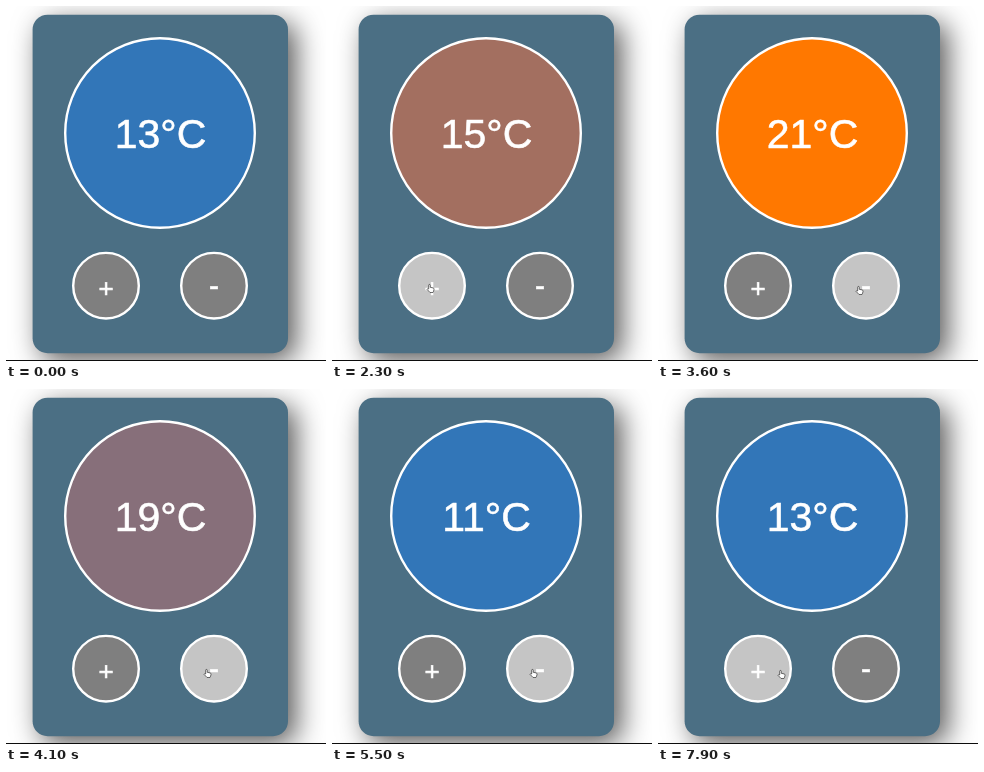
Recreate the animation shown at these times as an HTML page. Size 320x355 px, loop 8000 ms.

```html
<!DOCTYPE html>
<html lang="en">
<head>
<meta charset="utf-8">
<title>Thermostat</title>
<style>
  html, body { margin: 0; width: 100%; height: 100%; overflow: hidden; background: #fff; }
  svg { display: block; width: 100vw; height: 100vh; }
  text {
    font-family: "Liberation Sans", Arial, sans-serif;
    fill: #fff; stroke: #fff; stroke-width: .6; text-anchor: middle;
  }
  .card { fill: #4b6f84; filter: drop-shadow(8px 8px 14px rgba(0, 0, 0, .65)); }
  .ring { stroke: #fff; stroke-width: 2.4; }
</style>
</head>
<body>
<svg viewBox="0 0 320 355">
  <rect class="card" x="26.6" y="8.7" width="255.4" height="338.5" rx="15"/>
  <rect y="354" width="320" height="1" fill="#0c0c0c"/>
  <circle id="dial" class="ring" cx="154" cy="127" r="94.8"/>
  <text id="temp" x="154.5" y="141.7" font-size="41"></text>
  <circle id="plus" class="ring" cx="100" cy="279.7" r="32.8"/>
  <text x="100" y="290.5" font-size="26">+</text>
  <circle id="minus" class="ring" cx="208" cy="279.7" r="32.8"/>
  <text x="208" y="290" font-size="30">-</text>
  <path id="hand" fill="#fff" stroke="#333" stroke-width="1.3" stroke-linejoin="round"
    d="M4 9V2.2a1.4 1.4 0 0 1 2.8 0V6l5.2 1.1q2 .5 1.7 2.6l-.8 3.3-1 2.4H6.4L1 9.8q.4-2 3-.8z"/>
</svg>
<script>
const LOOP = 8000, STEP = 100, FADE = 500;
const COLD = [50, 118, 184], HOT = [255, 120, 0];
const BEND = [0, -8, 14]; // pulls the halfway colour towards rose
const el = id => document.getElementById(id);
const [dial, temp, plus, minus, hand] = ['dial', 'temp', 'plus', 'minus', 'hand'].map(el);

// steady runs of button presses
const runs = [
  { from: 1960, gap: 180, presses: 8, by: 1 },
  { from: 3800, gap: 180, presses: 10, by: -1 },
  { from: 7500, gap: 400, presses: 2, by: 1 }
];
const heatAt = runs[0].from + runs[0].gap, coolAt = 3930;

const entry = { at: 1000, x: 142, y: 262 };
const moves = [
  { at: 1000, x: 98, y: 282 },
  { at: 3250, x: 201, y: 284 },
  { at: 6200, x: 123, y: 285 }
];
const MOVE = 320;

const clamp = (v, lo, hi) => Math.min(hi, Math.max(lo, v));
const smooth = x => x * x * (3 - 2 * x);

// the CSS "ease" curve, cubic-bezier(.25, .1, .25, 1)
function ease(x) {
  const bez = (a, b, s) => 3 * a * s * (1 - s) ** 2 + 3 * b * s * s * (1 - s) + s ** 3;
  let lo = 0, hi = 1;
  for (let i = 0; i < 20; i++) {
    const mid = (lo + hi) / 2;
    if (bez(.25, .25, mid) < x) lo = mid; else hi = mid;
  }
  return bez(.1, 1, lo);
}

function degrees(t) {
  return runs.reduce((sum, { from, gap, presses, by }) =>
    sum + by * clamp(Math.floor((t - from) / gap) + 1, 0, presses), 13);
}

function dialColor(t) {
  const fade = at => ease(clamp((t - at) / FADE, 0, 1));
  const h = fade(heatAt) - fade(coolAt);
  const rgb = COLD.map((c, i) =>
    Math.round(c + (HOT[i] - c) * h + BEND[i] * 4 * h * (1 - h)));
  return `rgb(${rgb})`;
}

function pointer(t) {
  let { x, y } = entry;
  for (const m of moves) {
    const k = smooth(clamp((t - m.at) / MOVE, 0, 1));
    x += (m.x - x) * k;
    y += (m.y - y) * k;
  }
  return [x, y];
}

function draw(time) {
  const t = Math.floor((time % LOOP) / STEP) * STEP;
  temp.textContent = degrees(t) + '°C';
  dial.setAttribute('fill', dialColor(t));

  const [x, y] = pointer(t), shown = t >= entry.at;
  for (const button of [plus, minus]) {
    const { cx, cy } = button;
    const over = shown && Math.hypot(x - cx.baseVal.value, y - cy.baseVal.value) < 34;
    button.setAttribute('fill', over ? '#c5c5c5' : '#7f7f7f');
  }
  hand.setAttribute('visibility', shown ? 'visible' : 'hidden');
  hand.setAttribute('transform', `translate(${x - 3.5} ${y - 4}) scale(.55)`);
}

const start = performance.now();
function tick(now) {
  draw(Math.max(0, now - start));
  requestAnimationFrame(tick);
}
draw(0);
requestAnimationFrame(tick);
</script>
</body>
</html>
```
